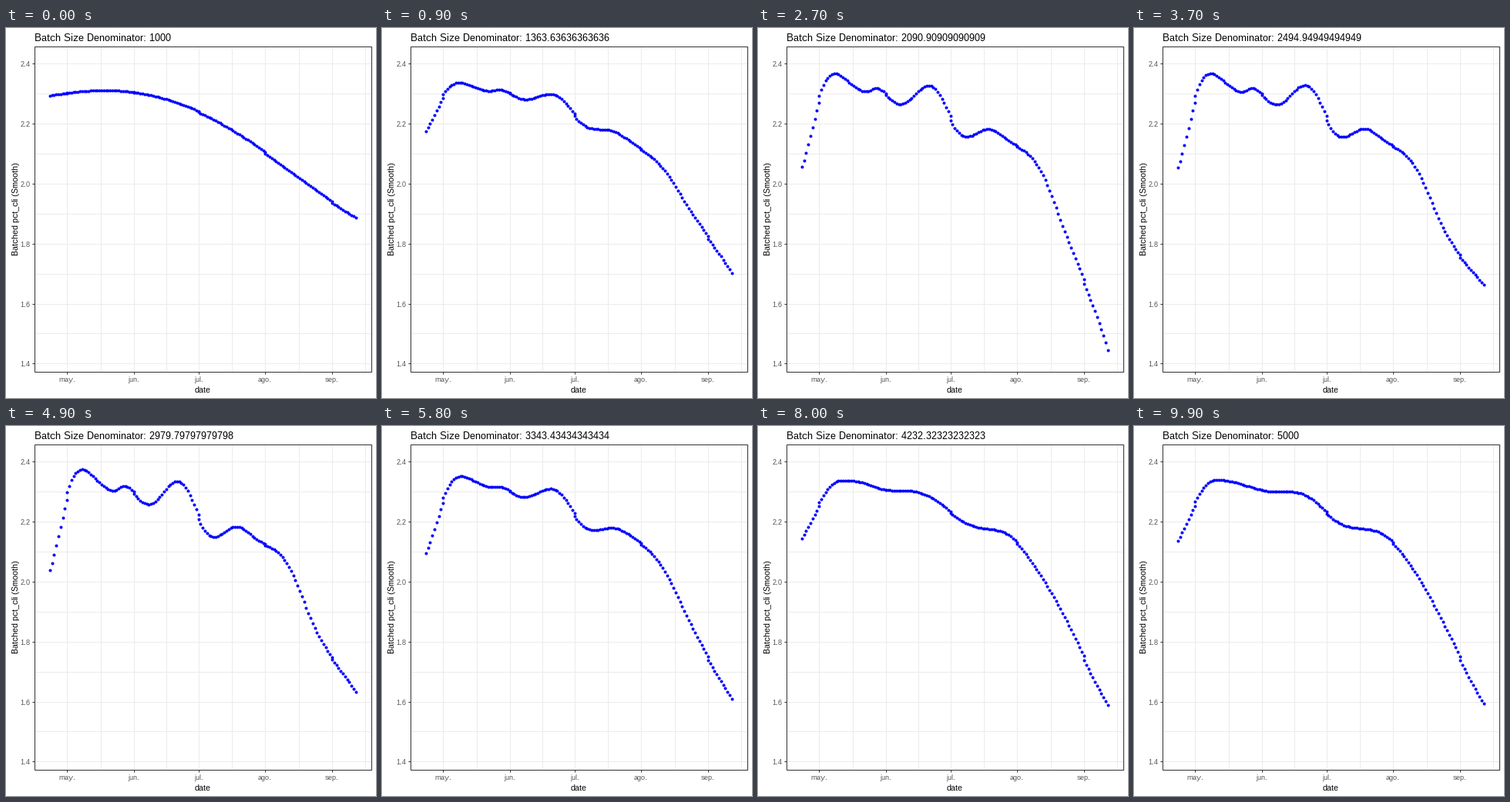
A matplotlib script for the animation above (10 s loop, 480x480 px).

```python
import numpy as np
import matplotlib.pyplot as plt
from matplotlib.animation import FuncAnimation
from matplotlib.patches import Rectangle

plt.rcParams.update({
    "font.family": "Liberation Sans",
    "text.hinting": "native",
    "text.hinting_factor": 1,
})

SIZE, DPI = 480, 72
FRAMES, INTERVAL = 100, 100
LEFT, TOP, RIGHT, BOTTOM = 37.5, 24.5, 474.5, 446.5
GRID, EDGE, LABEL = "#EBEBEB", "#333333", "#4D4D4D"

# One dot per day; the first day of each month holds two.
DAY, START = 2.795, 56.84
MONTHS = ["may.", "jun.", "jul.", "ago.", "sep."]
month_days = np.array([8, 39, 69, 100, 131])
dot_x = START + DAY * np.sort(np.concatenate([np.arange(143), month_days]))
u = np.linspace(dot_x[0], dot_x[-1], len(dot_x))


def swing(points):
    """Cosine-eased curve through a row of turning points."""
    x, y = np.array(points, float).T
    k = np.clip(np.searchsorted(x, u, side="right") - 1, 0, len(x) - 2)
    s = (u - x[k]) / (x[k + 1] - x[k])
    return y[k] + (y[k + 1] - y[k]) * (1 - np.cos(np.pi * s)) / 2


# All shapes are in pixels, downwards.
trend = np.polyval(np.polyfit([57, 132, 235, 345, 454],
                              [87.5, 81, 102, 168, 246], 4), u)
bend = swing([(36, 80), (106, -11.5), (172, 0), (218, -7.5),
              (268, 8.5), (325, -11), (510, 148)])
wiggle = swing([(48, 45), (90, -19), (137, 9), (155, -2), (186, 16.5),
                (226, -19), (265, 17.5), (300, -3), (325, 5),
                (364, -11), (402, 8), (454, -15)])
tail = np.clip((u - 337) / (u[-1] - 337), 0, 1) ** 3

# Share of each shape over time.
BEND = [(0, 0), (18, 1)]
WIGGLE = [(0, 0), (18, 0.8), (37, 0.85), (49, 1), (67, -0.15), (99, 0)]
TAIL = [(0, 0), (18, 41), (26, 78), (37, -14), (49, 0)]


def share(step, keys):
    return np.interp(step, *zip(*keys))


def heights(step):
    return (trend + share(step, BEND) * bend
            + share(step, WIGGLE) * wiggle + share(step, TAIL) * tail)


fig = plt.figure(figsize=(SIZE / DPI, SIZE / DPI), dpi=DPI, facecolor="white")
ax = fig.add_axes([0, 0, 1, 1])
ax.set(xlim=(0, SIZE), ylim=(SIZE, 0))
ax.axis("off")


def line(xs, ys, color, z):
    ax.plot(xs, ys, color=color, lw=1, zorder=z, snap=False,
            solid_capstyle="butt")


def label(x, y, text, size, color="black", **kw):
    return ax.text(x, y, text, fontsize=size, color=color,
                   va="baseline", **kw)


def with_middles(ticks):
    return np.concatenate([ticks, (ticks[1:] + ticks[:-1]) / 2])


def on_pixel(v):
    return np.round(v) + 0.5


ticks_x = START + DAY * month_days
ticks_y = 46 + 77.88 * np.arange(6)
beyond = ticks_x[-1] + 31 * DAY

for x in on_pixel(with_middles(np.append(ticks_x, beyond))):
    if x < RIGHT:
        line([x, x], [TOP, BOTTOM], GRID, 1)
for y in on_pixel(with_middles(ticks_y)):
    line([LEFT, RIGHT], [y, y], GRID, 1)

for x, name in zip(on_pixel(ticks_x), MONTHS):
    line([x, x], [BOTTOM, BOTTOM + 3], EDGE, 4)
    label(x - 0.5, 459, name, 9, LABEL, ha="center")
for i, y in enumerate(on_pixel(ticks_y)):
    line([LEFT - 3, LEFT], [y, y], EDGE, 4)
    label(31.5, y + 3.5, f"{2.4 - 0.2 * i:.1f}", 9, LABEL, ha="right")

ax.add_patch(Rectangle((LEFT, TOP), RIGHT - LEFT, BOTTOM - TOP, fill=False,
                       ec=EDGE, lw=1, zorder=4, snap=False))
label(255.5, 473, "date", 11, ha="center")
label(16, 234.5, "Batched pct_cli (Smooth)", 11, ha="center",
      rotation=90, rotation_mode="anchor")

title = label(37, 17, "", 13, ha="left")
dots, = ax.plot([], [], "o", color="#0000FF", ms=4, mew=0, zorder=3,
                antialiased=False)


def update(step):
    title.set_text(f"Batch Size Denominator: {1000 + 4000 * step / 99:.15g}")
    dots.set_data(dot_x, heights(step))
    return title, dots


anim = FuncAnimation(fig, update, frames=FRAMES, interval=INTERVAL,
                     repeat=True, repeat_delay=0, blit=False)
plt.show()
```
